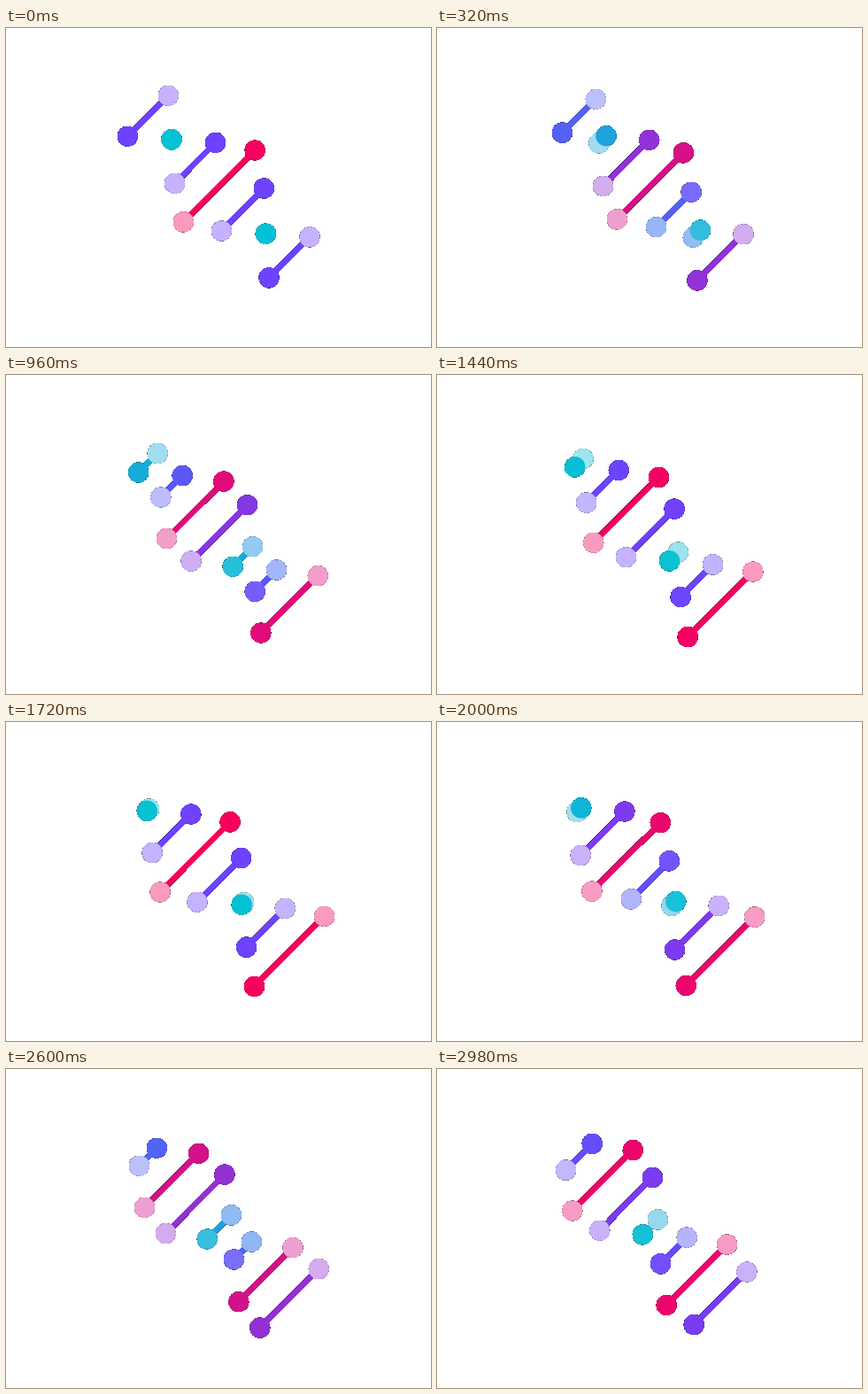
An HTML page with a canvas that plays this animation: 480x360 px, repeating every 3 s.

```html
<!DOCTYPE html>
<html>
<head>
<meta charset="utf-8">
<title>Helix</title>
<style>
html, body { margin: 0; height: 100%; overflow: hidden; background: #fff; }
canvas { display: block; }
</style>
</head>
<body>
<canvas id="stage" width="480" height="360"></canvas>
<script>
const ctx = document.getElementById('stage').getContext('2d', { willReadFrequently: true });
const LOOP = 3000, STEP = 1812, RADIUS = 11.8;

const purple = [110, 66, 255], teal = [4, 194, 211], red = [248, 0, 94];
const tint = color => color.map(v => 255 + (v - 255) * 0.4);

// Each rung moves one place along these lists per step.
const reach = [-23, 0, 23, 40.4, 24, 0, -23, -40.4, -24];
const base = [purple, teal, purple, red, purple, teal, purple, red, purple];
const light = base.map(tint);
const headColors = base.map((c, i) => i === 5 ? light[i] : c);
const tailColors = light.map((c, i) => i === 5 ? base[i] : c);

const lerp = (a, b, f) => a + (b - a) * f;
const blend = (list, i, f) =>
  `rgb(${list[i].map((v, c) => Math.round(lerp(v, list[i + 1][c], f)))})`;

// cubic-bezier(.25, .1, .25, 1)
function ease(x) {
  const curve = (a, b, u) => 3 * a * u * (1 - u) ** 2 + 3 * b * u * u * (1 - u) + u ** 3;
  let lo = 0, hi = 1;
  for (let n = 0; n < 20; n++) {
    const mid = (lo + hi) / 2;
    if (curve(0.25, 0.25, mid) < x) lo = mid; else hi = mid;
  }
  return curve(0.1, 1, lo);
}

function dot(x, y, color) {
  ctx.fillStyle = color;
  ctx.beginPath();
  ctx.arc(x, y, RADIUS, 0, 2 * Math.PI);
  ctx.fill();
}

function drawRung(n, step, f, mix) {
  const i = n + step;
  const shift = n === 3 || n === 4 ? 0.6 : 0;
  const x = 160.4 + 26.6 * n + shift, y = 99.2 + 26.6 * n - shift;
  const d = lerp(reach[i], reach[i + 1], f);

  ctx.strokeStyle = blend(base, i, mix);
  ctx.lineWidth = 7;
  ctx.beginPath();
  ctx.moveTo(x - d, y + d);
  ctx.lineTo(x + d, y - d);
  ctx.stroke();

  const head = () => dot(x + d, y - d, blend(headColors, i, mix));
  const tail = () => dot(x - d, y + d, blend(tailColors, i, mix));
  if (i < 4) { tail(); head(); } else { head(); tail(); }
}

// Hard silhouette: half-covered edge pixels turn opaque and dark, fainter ones vanish.
function hardenEdges() {
  const image = ctx.getImageData(0, 0, 480, 360), px = image.data;
  for (let p = 0; p < px.length; p += 4) {
    const alpha = px[p + 3];
    for (let c = 0; c < 3; c++) px[p + c] *= alpha / 255;
    px[p + 3] = alpha < 128 ? 0 : 255;
  }
  ctx.putImageData(image, 0, 0);
}

function draw() {
  const t = performance.now() % LOOP;
  const step = Math.floor(t / STEP), f = t / STEP - step;
  const mix = ease(f);
  ctx.clearRect(0, 0, 480, 360);
  for (let n = 0; n < 7; n++) drawRung(n, step, f, mix);
  hardenEdges();
  requestAnimationFrame(draw);
}
draw();
</script>
</body>
</html>
```
